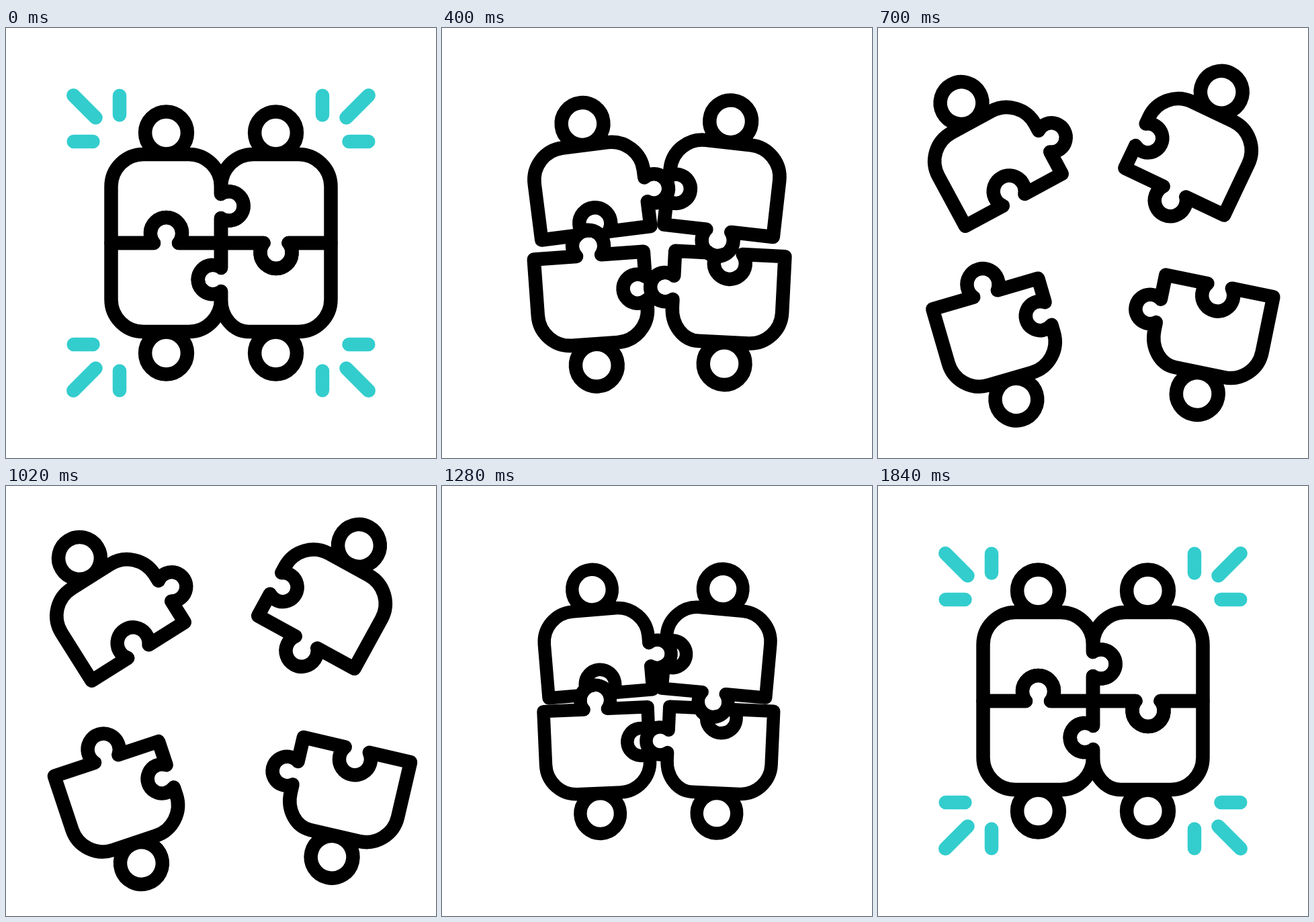
Animation, 640 px wide and 640 px high, one loop 2400 ms. Source, as an HTML page with a canvas:

```html
<!DOCTYPE html>
<html>
<head>
<meta charset="utf-8">
<style>
html, body { margin: 0; width: 100%; height: 100%; overflow: hidden; background: #fff; }
canvas { display: block; width: 100vw; height: 100vh; }
</style>
</head>
<body>
<canvas id="stage" width="640" height="640"></canvas>
<script>
const ctx = document.getElementById('stage').getContext('2d');
const LOOP = 2400, MID = 320;

// c: pivot, move and turn: offset when fully apart, knob: x, y, radius of the tab's opening
const pieces = [
  { c: [238.5, 254], move: [-76.8, -63.7], turn: -32.2, head: -98, knob: [332, 265, 11.2],
    d: `M156.5 320V236A48 48 0 0 1 204.5 188H272A48 48 0 0 1 320 236V247
        A21.6 21.6 0 1 1 320 283V320H257A23.5 23.5 0 1 0 220 320Z` },
  { c: [401.5, 254], move: [76.8, -79.5], turn: 28.75, head: -98, knob: [402, 334, 13],
    d: `M320 320V283A21.6 21.6 0 1 0 320 247V236A48 48 0 0 1 368 188H435.5
        A48 48 0 0 1 483.5 236V320H420.5A23.5 23.5 0 1 1 383.5 320Z` },
  { c: [238.5, 386], move: [-68, 82.5], turn: -18.4, head: 98, knob: [238.5, 306, 13],
    d: `M156.5 320H220A23.5 23.5 0 1 1 257 320H320V357A21.6 21.6 0 1 0 320 392V404
        A48 48 0 0 1 272 452H204.5A48 48 0 0 1 156.5 404Z` },
  { c: [401.5, 386], move: [105.8, 70.8], turn: 13.1, head: 98, knob: [308, 374.5, 11.2],
    d: `M320 320H383.5A23.5 23.5 0 1 0 420.5 320H483.5V404A48 48 0 0 1 435.5 452H361
        A41 48 0 0 1 320 404V392A21.6 21.6 0 1 1 320 357Z` }
];
for (const p of pieces) {
  p.path = new Path2D(p.d);
  p.path.moveTo(p.c[0] + 31.4, p.c[1] + p.head);
  p.path.arc(p.c[0], p.c[1] + p.head, 31.4, 0, 7);
}

// inner end, outer end, measured from the stage centre
const rays = [[186.5, 186.5, 219.7, 219.7], [151, 190.5, 151, 219.3], [190.5, 151, 219.3, 151]];

const part = (t, a, b) => Math.min(1, Math.max(0, (t - a) / (b - a)));
const easeOut = u => 1 - (1 - u) ** 3;
const inOut = u => u < .5 ? 4 * u ** 3 : 1 - 4 * (1 - u) ** 3;
const ramp = (t, a, b) => inOut(part(t, a, b));
const rad = deg => deg * Math.PI / 180;

function drawRays(grown) {
  if (grown <= 0) return;
  ctx.strokeStyle = '#33cdcd';
  ctx.beginPath();
  for (const sx of [-1, 1]) for (const sy of [-1, 1])
    for (const [x0, y0, x1, y1] of rays) {
      ctx.moveTo(MID + sx * x0, MID + sy * y0);
      ctx.lineTo(MID + sx * (x0 + (x1 - x0) * grown), MID + sy * (y0 + (y1 - y0) * grown));
    }
  ctx.stroke();
}

function inPose(p, apart, draw) {
  const [x, y] = p.c;
  ctx.save();
  ctx.translate(x + p.move[0] * apart, y + p.move[1] * apart);
  ctx.rotate(rad(p.turn * apart));
  ctx.translate(-x, -y);
  draw(p);
  ctx.restore();
}

function render(t) {
  const apart = ramp(t, 30, 1000) - ramp(t, 1045, 1405);
  const back = ramp(t, 1520, 1840);
  const scale = 1 - .051 * (ramp(t, 1040, 1280) - back);
  const tilt = 2.95 * (ramp(t, 1160, 1520) - back);

  ctx.fillStyle = '#fff';
  ctx.fillRect(0, 0, 640, 640);
  ctx.lineWidth = 20.5;
  ctx.lineCap = ctx.lineJoin = 'round';
  drawRays(t < 1000 ? 1 - ramp(t, 0, 340) : easeOut(part(t, 1300, 1840)));

  ctx.save();
  ctx.translate(MID, MID);
  ctx.rotate(rad(tilt));
  ctx.scale(scale, scale);
  ctx.translate(-MID, -MID);
  ctx.strokeStyle = '#000';
  for (const p of pieces) inPose(p, apart, p => ctx.stroke(p.path));
  // each tab lies above its neighbour's socket
  for (const p of pieces) inPose(p, apart, ({ knob: [x, y, r] }) => {
    ctx.beginPath();
    ctx.arc(x, y, r, 0, 7);
    ctx.fill();
  });
  ctx.restore();
}

const start = performance.now();
function tick() {
  render((performance.now() - start) % LOOP);
  requestAnimationFrame(tick);
}
tick();
</script>
</body>
</html>
```
